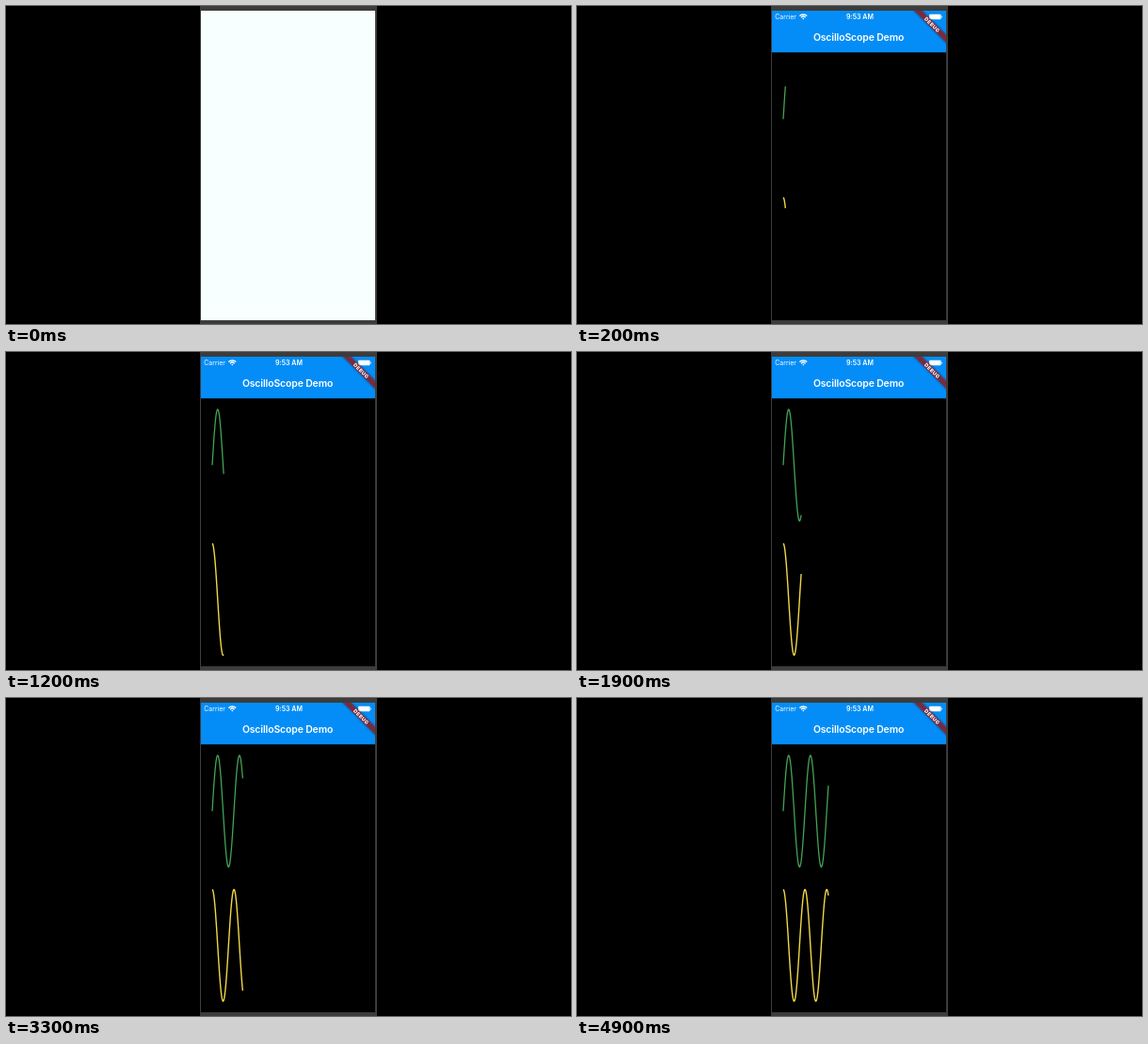
These frames come from a looping animation (600x338 px, 5000 ms). An HTML page:

```html
<!DOCTYPE html>
<html lang="en">
<head>
<meta charset="utf-8">
<title>OscilloScope Demo</title>
<style>
  html, body { margin: 0; width: 100%; height: 100%; overflow: hidden; background: #000; }
  svg { display: block; width: 100vw; height: 100vh; }
  text { font-family: Inter, "Liberation Sans", sans-serif; fill: #fff; }
  .trace { fill: none; stroke-linejoin: round; }
</style>
</head>
<body>
<svg viewBox="0 0 600 338" preserveAspectRatio="none">
  <defs>
    <clipPath id="screen"><rect x="207" y="5" width="185" height="329"/></clipPath>
    <filter id="soft" x="-20%" y="-100%" width="140%" height="300%"><feGaussianBlur stdDeviation="1.2"/></filter>
  </defs>
  <rect width="600" height="338" fill="#000"/>
  <rect x="206" width="188" height="338" fill="#3c3c3c"/>
  <g clip-path="url(#screen)">
    <rect x="207" y="5" width="185" height="329" fill="#000"/>
    <rect x="207" y="5" width="185" height="44.3" fill="#048df7"/>

    <text x="210.3" y="14" font-size="6.9">Carrier</text>
    <g fill="none" stroke="#fff" stroke-width="1.4">
      <path d="M236.4 10.6a5.5 5.5 0 0 1 7.8 0"/>
      <path d="M238 12.2a3.3 3.3 0 0 1 4.6 0"/>
      <path d="M240.3 14.4l-1.1-1.2a1.6 1.6 0 0 1 2.2 0z" fill="#fff" stroke="none"/>
    </g>
    <text x="300.5" y="14" font-size="7" font-weight="600" text-anchor="middle">9:53 AM</text>
    <rect x="374" y="8.8" width="12.6" height="5.4" rx="1.2" fill="#fff"/>
    <rect x="387.1" y="10.5" width="0.8" height="2" rx="0.4" fill="#fff"/>
    <text x="299" y="37.2" font-size="10.4" font-weight="600" letter-spacing="-0.1" text-anchor="middle">OscilloScope Demo</text>

    <polyline id="sine" class="trace" stroke="#43a355" stroke-width="1.3"/>
    <polyline id="cosine" class="trace" stroke="#f0d648" stroke-width="1.4"/>

    <g transform="translate(392 5) rotate(45)">
      <rect x="-40" y="18.1" width="80" height="6" fill="#000" opacity="0.5" filter="url(#soft)"/>
      <rect x="-40" y="18.1" width="80" height="6" fill="#b71c1c" opacity="0.63"/>
      <text x="0.2" y="23" font-size="5.3" font-weight="800" letter-spacing="0.45" text-anchor="middle">DEBUG</text>
    </g>

    <rect id="splash" x="207" y="5" width="185" height="329" fill="#f8ffff"/>
  </g>
</svg>
<script>
  const LOOP = 5000, TICK = 100;
  const LEFT = 219, STEP_X = 0.5775, AMP = 59.4;
  const STEP_ANGLE = Math.PI / 20;
  const splashFade = [1, 0.5];

  const byId = id => document.getElementById(id);
  const sine = byId('sine'), cosine = byId('cosine'), splash = byId('splash');

  function wave(fn, mid, count) {
    const points = [];
    for (let i = 0; i <= count; i++) {
      const x = LEFT + i * STEP_X;
      const y = mid - AMP * fn(i * STEP_ANGLE);
      points.push(x.toFixed(2) + ',' + y.toFixed(2));
    }
    return points.join(' ');
  }

  function draw(time) {
    const tick = Math.floor((time % LOOP) / TICK);
    // New samples arrive about every 60 ms, shown on a 100 ms beat.
    const count = Math.floor(1.67 * tick + 1.3);
    sine.setAttribute('points', wave(Math.sin, 120.3, count));
    cosine.setAttribute('points', wave(Math.cos, 262.9, count));
    splash.setAttribute('opacity', splashFade[tick] || 0);
  }

  const start = performance.now();
  function frame() {
    draw(performance.now() - start);
    requestAnimationFrame(frame);
  }
  frame();
</script>
</body>
</html>
```
